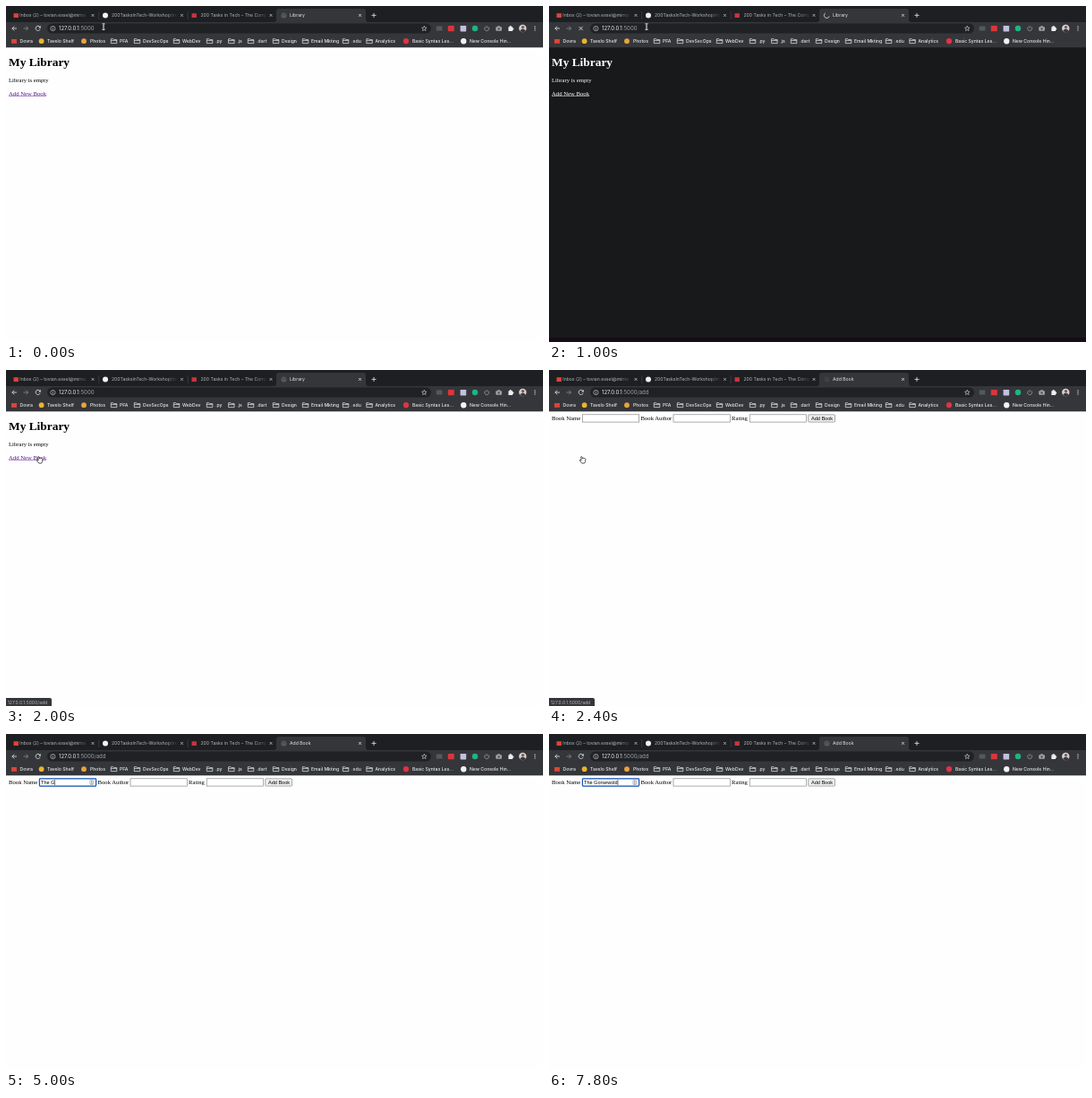
Write an HTML page that moves like this. It is 600 px wide and 375 px high and loops after 8 s.

```html
<!DOCTYPE html>
<html lang="en">
<head>
<meta charset="utf-8">
<title>My Library</title>
<style>
html, body { margin: 0; width: 100%; height: 100%; overflow: hidden; background: #fffeff; }
svg { display: block; width: 100vw; height: 100vh; }
text { white-space: pre; }
.ui { font: 400 5.1px Inter, sans-serif; fill: #e8eaed; }
.mark { font-weight: 500; }
.dim { fill: #b4b8bd; }
.url { font-size: 6px; }
.page { font: 6.7px "Liberation Serif", serif; }
.head { font: bold 13.4px "Liberation Serif", serif; }
.field { font: 5.55px "Liberation Sans", sans-serif; }
.line { fill: none; stroke: #dfe1e5; stroke-width: .85; }
</style>
</head>
<body>
<svg id="stage" viewBox="0 0 600 375">
  <defs>
    <linearGradient id="fade">
      <stop offset="0" stop-color="#1e1f22" stop-opacity="0"/>
      <stop offset="1" stop-color="#1e1f22"/>
    </linearGradient>
  </defs>
</svg>
<script>
const STEP = 200, LOOP = 8000;
const stage = document.getElementById('stage');

function add(tag, attrs, parent = stage, content = '') {
  const node = document.createElementNS('http://www.w3.org/2000/svg', tag);
  for (const key in attrs) node.setAttribute(key, attrs[key]);
  node.textContent = content;
  return parent.appendChild(node);
}
const group = parent => add('g', {}, parent);
const rect = (x, y, width, height, fill, more = {}, parent) =>
  add('rect', { x, y, width, height, fill, ...more }, parent);
const dot = (cx, cy, r, fill, parent) => add('circle', { cx, cy, r, fill }, parent);
const line = (d, more = {}, parent) => add('path', { d, class: 'line', ...more }, parent);
const label = (x, y, content, cls = 'ui', parent) => add('text', { x, y, class: cls }, parent, content);
const show = (node, on) => node.setAttribute('visibility', on ? 'visible' : 'hidden');
const cross = (x, y, r, more, parent) =>
  line(`M${x - r} ${y - r}l${2 * r} ${2 * r}m0 ${-2 * r}l${-2 * r} ${2 * r}`, more, parent);

// Pages
const paper = rect(0, 46, 600, 329, '#fffeff');
const paperEdge = rect(0, 370, 600, 5, '#150c16');
const library = group();
label(3, 67, 'My Library', 'head', library);
label(3, 85.3, 'Library is empty', 'page', library);
const link = group(library);
label(3, 99.6, 'Add New Book', 'page', link);
rect(3, 100.3, 42, .5, 'currentColor', {}, link);

const form = group();
label(3, 55.8, 'Book Name', 'page', form);
label(102.5, 55.8, 'Book Author', 'page', form);
label(204, 55.8, 'Rating', 'page', form);
for (const x of [37.3, 139, 224.2])
  rect(x, 49.8, 63.4, 8.3, '#fff', { stroke: '#767676', 'stroke-width': .6 }, form);
rect(289.7, 49.8, 29.8, 8.3, '#efefef', { rx: 1, stroke: '#767676', 'stroke-width': .6 }, form);
label(293, 56, 'Add Book', 'field', form);

const focus = group(form);
rect(37.4, 49.8, 63.2, 8.3, '#fff', { rx: 1, stroke: '#175bc4', 'stroke-width': 1.3 }, focus);
rect(93.9, 51.4, 3.6, 5, '#f2f2f2', { rx: .5, stroke: '#888', 'stroke-width': .5 }, focus);
dot(95.7, 53.2, .7, '#777', focus);
line('M94.7 55.3h2', { style: 'stroke:#777;stroke-width:.7' }, focus);
const typed = label(39, 56, '', 'field', focus);
const caret = rect(39, 51, .5, 6, '#000', {}, focus);

// Tab strip
rect(0, 0, 600, 18, '#1e1f22');
rect(0, 18, 600, 28.3, '#35363a');
add('path', { d: 'M299 18q3 0 3-3V6q0-3 3-3h94q3 0 3 3v9q0 3 3 3z', fill: '#35363a' });
[
  [8.5, 15.3, 'Inbox (2) – tovian.essel@mirna', '#dc4437', 'square'],
  [108, 118, '200TasksInTech-Workshop/ma', '#f1f3f4'],
  [207.5, 217.5, '200 Tasks in Tech – The Comp', '#c9343c', 'square']
].forEach(([iconX, textX, title, color, shape], i) => {
  if (shape) rect(iconX, 8.2, 5.4, 4.8, color);
  else dot(iconX + 3, 10.4, 3, color);
  label(textX, 12.3, title, 'ui dim');
  const end = 92 + i * 100;
  rect(end - 13, 4, 13, 13, 'url(#fade)');
  rect(end, 4, 10, 13, '#1e1f22');
  cross(97 + i * 99.5, 10.4, 1.4, { style: 'stroke:#b4b8bd' });
});
for (const x of [103.7, 203.2]) line(`M${x} 6v9`, { style: 'stroke:#505357;stroke-width:.5' });
cross(395.5, 10.4, 1.4);
line('M408.5 10.4h5M411 7.9v5');
const tabTitle = label(317, 12.3, '');
const globe = group();
dot(310.4, 10.4, 3, '#595c60', globe);
line('M308 9l2 1 0 2M311 8l1 2 1 0', { style: 'stroke:#3d3f43' }, globe);
const sparkle = line('M309 8.2a2.6 2.6 0 0 1 1.6-.6');
const spinner = line('M308.8 7.9a3 3 0 1 0 4.4 3.5');

// Toolbar
line('M12 25h-5.2m2.4-2.4L6.8 25l2.4 2.4');
line('M19.5 25h5.2m-2.4-2.4l2.4 2.4l-2.4 2.4', { style: 'stroke:#85888c' });
const reload = group();
line('M37.9 23.4a2.6 2.6 0 1 0 .3 2.4', {}, reload);
add('path', { d: 'M38.8 22v2.6h-2.6z', fill: '#dfe1e5' }, reload);
const stop = cross(35.6, 25, 2.1, {});
rect(46, 19.6, 429, 11, '#202124', { rx: 5.5 });
add('circle', { cx: 52.4, cy: 25.1, r: 2.6, class: 'line', style: 'stroke-width:.6' });
line('M52.4 24.8v1.8M52.4 23.4v.7', { style: 'stroke-width:.7' });
const url = label(59, 27.2, '', 'ui url');
add('tspan', {}, url, '127.0.0.1');
const path = add('tspan', { fill: '#9aa0a6' }, url);
const star = Array.from({ length: 10 }, (_, i) => {
  const a = i * Math.PI / 5 - Math.PI / 2, r = i % 2 ? 1.3 : 2.9;
  return [467.3 + r * Math.cos(a), 25.2 + r * Math.sin(a)].map(v => v.toFixed(2));
}).join(' ');
add('polygon', { points: star, class: 'line', style: 'stroke-width:.6' });

rect(480.8, 22.6, 6.6, 5, '#55585c', { rx: .6 });
rect(493.8, 22, 7, 6.2, '#d8373a', { rx: .8 });
rect(507.6, 22, 6.6, 6.4, '#c3c0df', { rx: .6 });
dot(524, 25, 3.2, '#1cb584');
line('M535.6 23.2a2.5 2.5 0 1 0 3.2 0M537.2 22v2.8', { style: 'stroke:#a3a6aa;stroke-width:.7' });
rect(547.3, 23.2, 6.6, 4.6, '#a3a6aa', { rx: .7 });
rect(549.4, 22.2, 2.4, 1.5, '#a3a6aa');
dot(550.6, 25.5, 1.3, '#55585c');
rect(561.4, 23.3, 4.7, 4.7, '#eceef0', { rx: .5 });
dot(563.7, 23, 1.1, '#eceef0');
dot(566.2, 25.6, 1.1, '#eceef0');
dot(577.3, 25, 4.2, '#d5cfcd');
dot(577.5, 23.6, 1.6, '#76584d');
add('path', { d: 'M574.2 27.8q3.2-4.4 6.5 0q-3 3-6.5 0z', fill: '#3b3740' });
for (const y of [22.9, 25, 27.1]) dot(591, y, .65, '#dfe1e5');

// Bookmarks
rect(6, 37, 6, 4.8, '#dc4437');
dot(39.6, 39.2, 2.9, '#e8b52c');
dot(87, 39.2, 2.9, '#e8a33b');
dot(447, 39.2, 3.1, '#df3347');
dot(511.2, 39.2, 3.2, '#f1f3f4');
[
  [15.5, 'Dovra'], [46, 'Tavelo Shelf'], [94, 'Photos'],
  [454, 'Basic Syntax Les...'], [518, 'New Console Hin...']
].forEach(([x, name]) => label(x, 41, name, 'ui mark'));
[
  [127, 'PFA'], [153, 'DevSecOps'], [197, 'WebDev'], [234, '.py'], [258.3, '.js'],
  [280, '.dart'], [308, 'Design'], [341, 'Email Mkting'], [386, '.edu'], [412.5, 'Analytics']
].forEach(([x, name]) => {
  line(`M${x - 9.7} 41.6v-4.9h2.5l.8.9h3.2v4zM${x - 9.7} 38.6h6.5`, { style: 'stroke-width:.75' });
  label(x, 41, name, 'ui mark');
});

// Link preview
const status = group();
rect(-3, 366, 54, 12, '#35363a', { rx: 2 }, status);
label(1.8, 372.6, '127.0.0.1:5000/add', 'ui dim', status);

// Pointers
const cursors = { beam: group(), arrow: group(), hand: group() };
const beam = 'M-1.4-3.3q1.4 0 1.4 1v4.6q0 1-1.4 1M1.4-3.3q-1.4 0-1.4 1M0 2.3q0 1 1.4 1M-.9 1h1.8';
line(beam, { style: 'stroke:#fff;stroke-width:1.4' }, cursors.beam);
line(beam, { style: 'stroke:#333;stroke-width:.6' }, cursors.beam);
add('path', { d: 'M0 0v7l1.6-1.5 1.1 2.5 1.1-.5-1-2.4h2.2z', fill: '#000', stroke: '#fff', 'stroke-width': .5 }, cursors.arrow);
add('path', {
  d: 'M-1.6-2.6q.8-.8 1.3.2l.5 1.9 .4-.9q.7-.3 1 .5.8-.4 1.1.4.8-.2.9.6l-.4 2.7-.9 1.8h-2.8l-2.4-3q-.2-1 .9-.7l.8.6z',
  fill: '#fff', stroke: '#111', 'stroke-width': .7
}, cursors.hand);

// Each entry holds until the next: first step, pointer, x, y
const moves = [
  [0, 'beam', 109, 23], [7, 'arrow', 92, 46], [8, 'arrow', 62, 78], [9, 'hand', 42, 97],
  [10, 'hand', 37.3, 99.5], [13, 'arrow', 36, 96], [14, 'arrow', 40, 84],
  [15, 'arrow', 50, 64], [16, 'beam', 55, 54], [19, 'none', 0, 0]
];
const TITLE = 'The Gorsewold';

function typedCount(step) {
  if (step < 19) return 0;
  return step < 25 ? 1 + Math.floor((step - 19) * 4 / 6) : 5 + Math.floor((step - 25) * 8 / 14);
}

function render(step) {
  const loading = step === 4 || step === 5 || step === 11;
  const dark = step === 5, onForm = step >= 12;

  paper.setAttribute('fill', dark ? '#18191b' : '#fffeff');
  show(paperEdge, dark);
  library.style.display = onForm ? 'none' : '';
  form.style.display = onForm ? '' : 'none';
  library.setAttribute('fill', dark ? '#fff' : '#000');
  link.setAttribute('fill', dark ? '#fff' : '#551a8b');
  link.setAttribute('color', dark ? '#fff' : '#551a8b');

  show(reload, !loading);
  show(stop, loading);
  show(globe, !loading);
  globe.setAttribute('opacity', step === 12 ? .35 : 1);
  show(sparkle, step === 4);
  show(spinner, loading && step !== 4);
  tabTitle.textContent = onForm ? 'Add Book' : 'Library';
  path.textContent = step >= 11 ? ':5000/add' : ':5000';
  show(status, step >= 9 && step <= 13);

  focus.style.display = step >= 17 ? '' : 'none';
  typed.textContent = TITLE.slice(0, typedCount(step));
  caret.setAttribute('x', 39.1 + (typed.textContent ? typed.getComputedTextLength() : 0));

  const [, kind, x, y] = moves.findLast(move => move[0] <= step);
  for (const name in cursors) {
    show(cursors[name], name === kind);
    cursors[name].setAttribute('transform', `translate(${x} ${y})`);
  }
}

const start = performance.now();
let current = -1;
function tick() {
  const step = Math.floor((performance.now() - start) % LOOP / STEP);
  if (step !== current) render(current = step);
  requestAnimationFrame(tick);
}
tick();
</script>
</body>
</html>
```
